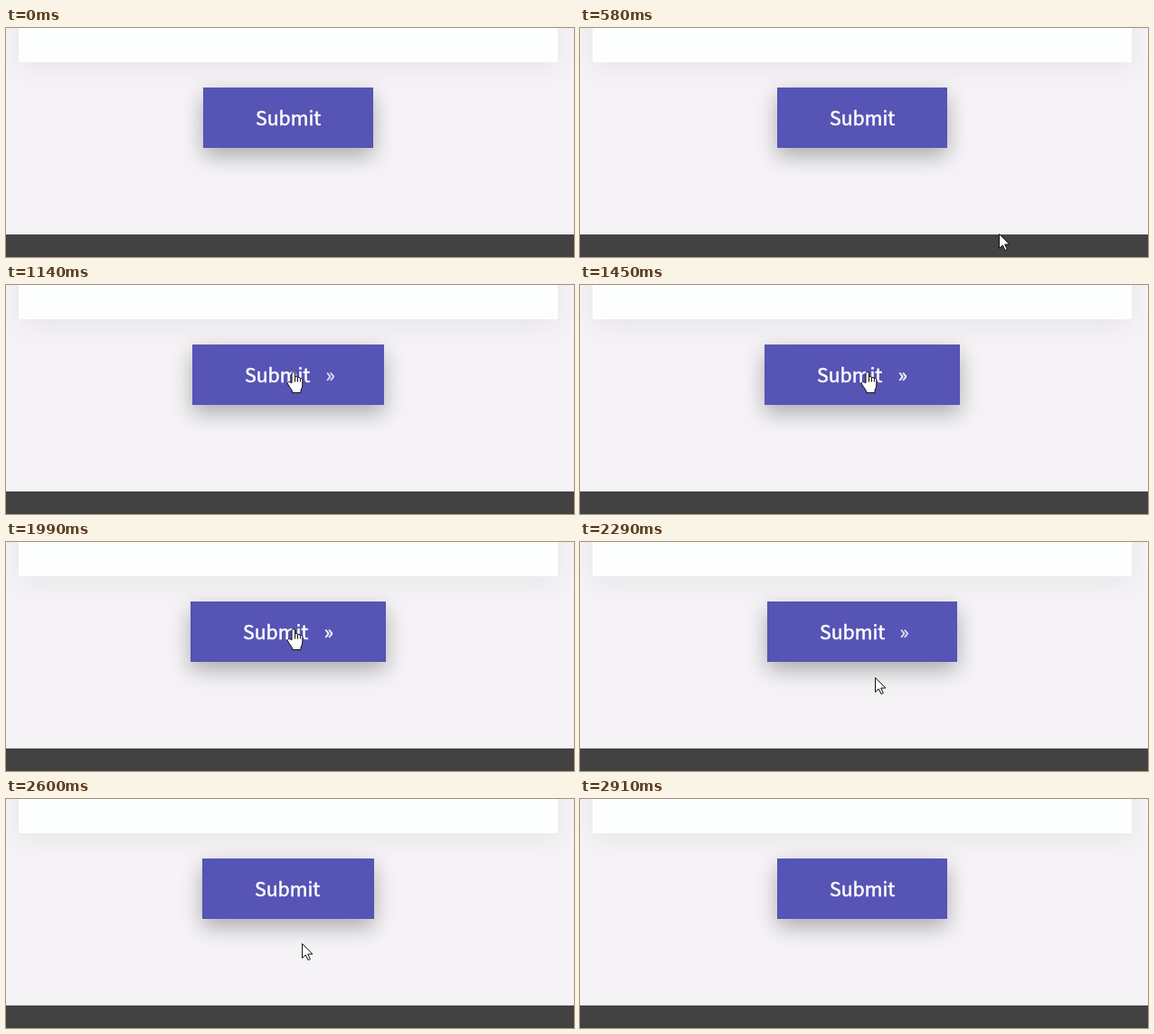
An HTML page with a canvas for the animation above (3370 ms loop, 628 by 254 pixels).

```html
<!DOCTYPE html>
<html lang="en">
<head>
<meta charset="utf-8">
<title>Submit button</title>
<style>
  html, body { margin: 0; height: 100%; overflow: hidden; background: #f5f3f6; }
  canvas { display: block; }
</style>
</head>
<body>
<canvas id="stage" width="628" height="254"></canvas>
<script>
const ctx = document.getElementById('stage').getContext('2d');
const LOOP = 3370, STEP = 77.5, FADE = 500;
const APPEAR = 580, ENTER = 878, DRIFT = 1970, LEAVE = 2203, EXIT = 2450, GONE = 2900;

const ARROW = new Path2D('M.5 .5V16.5L4.3 12.9L7 18.6L9.3 17.6L6.7 12H11.8Z');
const HAND = new Path2D('M-2 12.5V2Q-2 .5 -.2 .5Q1.5 .5 1.5 2V6.5Q1.8 5.5 3 5.5Q4.5 5.5 4.5 7' +
  'Q5 6.3 6 6.4Q7.4 6.6 7.4 8Q8 7.3 9 7.8Q9.8 8.2 9.8 9.5V15Q9.8 18 8 20.5V23.5H-1.5V21.5' +
  'Q-3 19 -4.5 17L-6.6 13.8Q-7 12.2 -5.7 11.5Q-4.4 11 -3.2 12.2Z');
const KNUCKLES = new Path2D('M1.5 6.5V11.5M4.5 7V11.5M7.4 8V11.5');

const progress = (t, start, length) => Math.min(1, Math.max(0, (t - start) / length));

// CSS "ease": cubic-bezier(.25, .1, .25, 1)
function ease(x) {
  if (x <= 0 || x >= 1) return x;
  const bezier = (s, a, b) => 3 * s * (1 - s) ** 2 * a + 3 * s * s * (1 - s) * b + s ** 3;
  let low = 0, high = 1;
  for (let i = 0; i < 20; i++) {
    const mid = (low + high) / 2;
    if (bezier(mid, 0.25, 0.25) < x) low = mid; else high = mid;
  }
  return bezier(low, 0.1, 1);
}

// The pointer slows down into the button, drifts off below it, then speeds away
function pointerAt(t) {
  const ahead = 1 - progress(t, APPEAR, 470);
  const drift = ease(progress(t, DRIFT, FADE));
  const exit = progress(t, EXIT, 378);
  return [
    Math.round(318.4 + 145 * ahead ** 3 + 8 * drift + 208 * exit ** 6),
    Math.round(96 + 132 * ahead ** 1.54 + 59.5 * drift + 79 * exit ** 3)
  ];
}

function box(x, y, w, h, color, shadow = 'transparent', offset = 0, blur = 0) {
  ctx.save();
  ctx.fillStyle = color;
  ctx.shadowColor = shadow;
  ctx.shadowOffsetY = offset;
  ctx.shadowBlur = blur;
  ctx.fillRect(x, y, w, h);
  ctx.restore();
}

// A thin stroke gives the label its slightly heavier weight
function label(text, x, align, alpha = 1) {
  ctx.save();
  ctx.font = '21.3px "Noto Sans CJK JP", "Noto Sans CJK SC", "Noto Sans", sans-serif';
  ctx.fillStyle = ctx.strokeStyle = '#fff';
  ctx.lineWidth = 0.5;
  ctx.lineJoin = 'round';
  ctx.textAlign = align;
  ctx.globalAlpha = alpha;
  ctx.fillText(text, x, 108);
  ctx.strokeText(text, x, 108);
  ctx.restore();
}

function drawButton(open) {
  const left = Math.floor(218 - 14 * open);
  box(left, 66, 624 - 2 * left, 67, '#5654b4', 'rgba(0,0,0,.3)', 9, 23);
  label('Submit', left + 58, 'left');
  label('»', 370.4 - 8.4 * open, 'right', open);
}

function drawPointer([x, y], hovering) {
  const shape = hovering ? HAND : ARROW;
  ctx.save();
  ctx.translate(x, y);
  ctx.fillStyle = '#fff';
  ctx.strokeStyle = '#111';
  ctx.fill(shape);
  ctx.stroke(shape);
  if (hovering) ctx.stroke(KNUCKLES);
  ctx.restore();
}

function draw(now) {
  const t = APPEAR + Math.floor((now % LOOP - APPEAR) / STEP) * STEP;
  const open = ease(progress(t, ENTER, FADE)) - ease(progress(t, LEAVE, FADE));
  box(0, 0, 628, 254, '#f5f3f6');
  box(14, -60, 596, 98, '#fdfffe', 'rgba(0,0,0,.06)', 8, 28);
  drawButton(open);
  box(0, 229, 628, 25, '#424242');
  if (t >= APPEAR && t < GONE) drawPointer(pointerAt(t), t > ENTER && t < LEAVE);
}

const begin = performance.now();
function tick() {
  draw(performance.now() - begin);
  requestAnimationFrame(tick);
}
tick();
</script>
</body>
</html>
```
